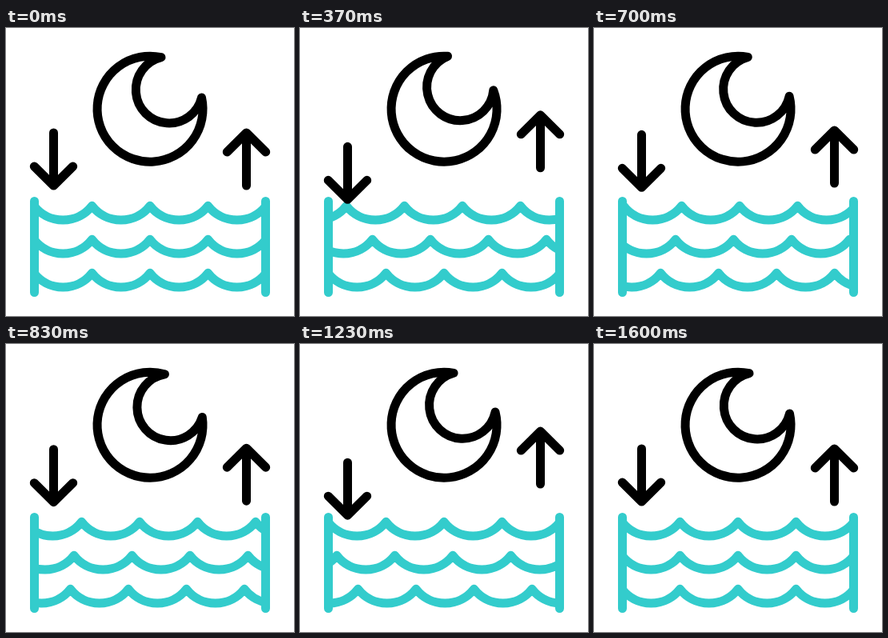
Animation, 360 px wide and 360 px high, one loop 1670 ms. Source, as an HTML page:

```html
<!DOCTYPE html>
<html lang="en">
<head>
<meta charset="utf-8">
<title>Tide and moon</title>
<style>
  html, body { margin: 0; width: 100%; height: 100%; overflow: hidden; background: #fff; }
  svg { display: block; width: 100vw; height: 100vh; }
  path { fill: none; stroke-width: 11; stroke-linecap: round; stroke-linejoin: round; }
  .ink { stroke: #000; }
  .sea { stroke: #33cccc; }
</style>
</head>
<body>
<svg viewBox="0 0 360 360">
  <clipPath id="basin"><rect x="35.5" y="200" width="289" height="150"/></clipPath>
  <g id="waves" clip-path="url(#basin)"></g>
  <path class="sea" d="M35.5 216.5V330.5M324.5 216.5V330.5"/>
  <path class="ink" id="moon" d="M194 36.7A66 66 0 1 0 244.5 87A41.7 41.7 0 1 1 194 36.7Z"/>
  <path class="ink" id="down" d="M59.5 131V197M35.3 173L59.5 197L83.7 173"/>
  <path class="ink" id="up" d="M300.5 197V131M276.3 155L300.5 131L324.7 155"/>
</svg>
<script>
const LOOP = 1670, STEPS = 48, WAVE = 72.5;
const $ = id => document.getElementById(id);

// Drift of each part at the key steps; the last key equals the first.
const KEYS = [0, 11, 17, 25, 31, 37, 48];
const TILT = [0, -8.3, -7.4, 4, 2.2, -1.7, 0];
const DRIFT = [
  [0, 23, 21, -13, 13, 0, 0],
  [0, -17, 8, -22.5, -21, 11, 0],
  [0, 0, -20.5, -27, -40, -35, 0]
];
const TIDE_KEYS = [0, 12.5, 23.6, 35.2, 48];

const rows = DRIFT.map((_, i) => {
  const path = document.createElementNS('http://www.w3.org/2000/svg', 'path');
  path.setAttribute('class', 'sea');
  path.setAttribute('d', `M${35 - WAVE} ${222.3 + i * 42}` + `a46 46 0 0 0 ${WAVE} 0`.repeat(6));
  $('waves').append(path);
  return path;
});

const segment = (keys, k) => {
  let i = 0;
  while (i < keys.length - 2 && k >= keys[i + 1]) i++;
  return i;
};

// Smooth periodic curve through the key values
function spline(vals, k) {
  const n = KEYS.length - 1;
  const time = i => KEYS[(i + n) % n] + STEPS * Math.floor(i / n);
  const val = i => vals[(i + n) % n];
  const slope = i => (val(i + 1) - val(i - 1)) / (time(i + 1) - time(i - 1));
  const i = segment(KEYS, k), h = time(i + 1) - time(i), u = (k - time(i)) / h;
  const s = u * u * (3 - 2 * u);
  return val(i) * (1 - s) + val(i + 1) * s
    + h * u * (1 - u) * ((1 - u) * slope(i) - u * slope(i + 1));
}

function tide(k) {
  const i = segment(TIDE_KEYS, k);
  const u = (k - TIDE_KEYS[i]) / (TIDE_KEYS[i + 1] - TIDE_KEYS[i]);
  const s = (1 - Math.cos(Math.PI * u)) / 2;
  return i % 2 ? 1 - s : s;
}

const move = (el, x, y) => el.setAttribute('transform', `translate(${x} ${y})`);

function draw(ms) {
  // 30 steps a second, on a 10 ms clock
  const k = Math.min(STEPS, Math.floor((Math.floor(ms / 10) * 3 + 1) / 10));
  rows.forEach((row, i) => move(row, spline(DRIFT[i], k), 0));
  $('moon').setAttribute('transform', `rotate(${spline(TILT, k)} 180 101)`);
  move($('down'), 0, 18 * tide(k));
  move($('up'), 0, -23 * tide(k));
}

const start = performance.now();
function tick() {
  draw((performance.now() - start) % LOOP);
  requestAnimationFrame(tick);
}
tick();
</script>
</body>
</html>
```
